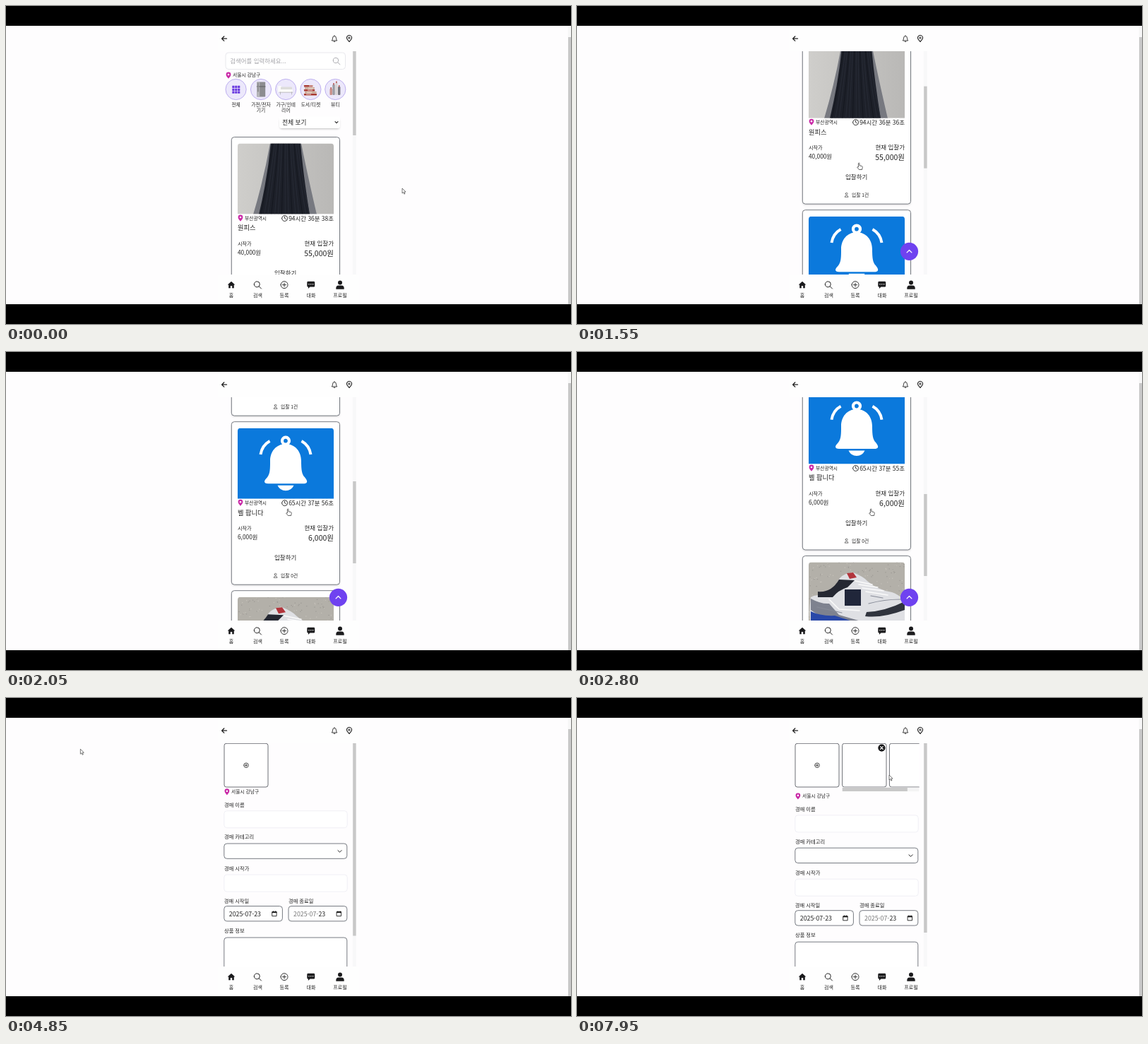
Write an HTML page that moves like this. It is 800 px wide and 450 px high and loops after 8000 ms.

```html
<!DOCTYPE html>
<html lang="ko">
<head>
<meta charset="utf-8">
<style>
  html, body { margin: 0; width: 100%; height: 100%; overflow: hidden; background: #000; }
  svg { display: block; width: 800px; height: 450px; }
  text { font-family: "Noto Sans CJK KR", "Noto Sans CJK", "Noto Sans", sans-serif; fill: #222; white-space: pre; }
  .line { fill: none; stroke: #222; stroke-linecap: round; stroke-linejoin: round; }
</style>
</head>
<body>
<svg id="stage" viewBox="0 0 800 450" xmlns="http://www.w3.org/2000/svg"></svg>
<script>
const LOOP = 8000, STEP = 50;
const LIST_END = 3100, IMAGES_AT = 7100;

// Drawing helpers; text is placed by its vertical centre.
const text = (x, cy, size, str, o = {}) =>
  `<text x="${x}" y="${cy + size * 0.36}" font-size="${size}" text-anchor="${o.anchor || 'start'}"
    font-weight="${o.weight || 400}" style="fill:${o.fill || '#222'}" ${o.id ? `id="${o.id}"` : ''}>${str}</text>`;
const rect = (x, y, w, h, fill, rx = 0, extra = '') =>
  `<rect x="${x}" y="${y}" width="${w}" height="${h}" rx="${rx}" fill="${fill}" ${extra}/>`;
const box = (x, y, w, h, stroke = '#555a63', width = 0.8, rx = 4) =>
  rect(x, y, w, h, '#fff', rx, `stroke="${stroke}" stroke-width="${width}"`);
const circle = (x, y, r, fill, extra = '') => `<circle cx="${x}" cy="${y}" r="${r}" fill="${fill}" ${extra}/>`;
const line = (d, width = 1, color = '#222') =>
  `<path class="line" d="${d}" stroke-width="${width}" style="stroke:${color}"/>`;
const shape = (d, fill) => `<path d="${d}" fill="${fill}"/>`;
const move = (x, y, body, id = '') => `<g ${id && `id="${id}"`} transform="translate(${x} ${y})">${body}</g>`;

// Icons, centred on the given point.
const pin = (x, y) => move(x, y,
  shape('M0 4.6C-1.6 2.6-3.4.8-3.4-1.2A3.4 3.4 0 0 1 3.4-1.2C3.4.8 1.6 2.6 0 4.6Z', '#c928a6') + circle(0, -1.1, 1.3, '#fff'));
const glass = (x, y, r, color, width) => move(x, y,
  line(`M${-r - 1} -1a${r} ${r} 0 1 0 ${2 * r} 0a${r} ${r} 0 1 0 ${-2 * r} 0M${r * .6} ${r * .6}L${r + 1.2} ${r + 1.2}`, width, color));
const plusCircle = (x, y, r, width) => move(x, y,
  line(`M${-r} 0a${r} ${r} 0 1 0 ${2 * r} 0a${r} ${r} 0 1 0 ${-2 * r} 0M${-r / 2} 0H${r / 2}M0 ${-r / 2}V${r / 2}`, width));
const chevron = (x, y, s, width, color, up = 1) => line(`M${x - s} ${y - s / 2 * up}L${x} ${y + s / 2 * up}L${x + s} ${y - s / 2 * up}`, width, color);

function header() {
  return rect(300, 28, 200, 36, '#fefefe') +
    line('M312.5 46.2H305.8M308.8 43L305.6 46.2L308.8 49.4', 1.3) +
    line('M461.5 48.7Q462.6 47.5 462.6 45.2A2.4 2.6 0 0 1 467.4 45.2Q467.4 47.5 468.5 48.7ZM464 50.3Q465 51.1 466 50.3M465 42.2V41.8', 0.9) +
    line('M486 50.6C484.6 48.7 482.4 47.2 482.4 45.1A3.6 3.6 0 0 1 489.6 45.1C489.6 47.2 487.4 48.7 486 50.6Z', 1.1) +
    line('M484.8 45.1a1.2 1.2 0 1 0 2.4 0a1.2 1.2 0 1 0-2.4 0', 0.9);
}

function nav() {
  const labels = [[319, '홈'], [356.5, '검색'], [394, '등록'], [432, '대화'], [473, '프로필']];
  return rect(300, 380, 200, 42, '#fefefe') +
    shape('M319 389.7L313.7 394.6H315.2V399.3H317.8V396H320.2V399.3H322.8V394.6H324.3Z', '#1b1b1d') +
    glass(356.3, 394.8, 4, '#222', 1) + plusCircle(394, 394.6, 5, 0.9) +
    shape('M427.7 389.8H435.8Q437.2 389.8 437.2 391.2V396.2Q437.2 397.6 435.8 397.6H430.4L427.9 400V397.6Q426.3 397.6 426.3 396.2V391.2Q426.3 389.8 427.7 389.8Z', '#1b1b1d') +
    [429, 431.8, 434.6].map(x => circle(x, 393.8, 0.75, '#fff')).join('') +
    circle(473, 391.6, 3, '#1b1b1d') +
    shape('M467.3 400.8Q466.8 395.4 471 395.4H475Q479.2 395.4 478.7 400.8Z', '#1b1b1d') +
    labels.map(([x, s]) => text(x, 409.3, 7, s, { anchor: 'middle' })).join('');
}

function categories() {
  const grid = Array.from({ length: 9 }, (_, i) =>
    rect(320.3 + i % 3 * 3.9, 112.8 + Math.floor(i / 3) * 3.9, 3.2, 3.2, '#6b3be0', 0.3)).join('');
  const fridge = rect(355.2, 107.5, 12, 21, '#8c8c90', 0.8) + rect(355.2, 107.5, 4, 21, '#b5b5b8', 0.8) +
    line('M355.2 114H367.2M357 109V113M357 115.5V121', 0.7, '#4c4c50');
  const sofa = rect(385, 113, 5, 9, '#fafafa', 1) + rect(389, 114.5, 16, 5, '#dddddb', 1) +
    rect(387, 118, 19, 4, '#fbfbf9', 1) + line('M387 122.2H406M388.5 122V125M404.5 122V125', 0.7, '#aaa');
  const books = [0, 1, 2, 3, 4].map(i => rect(422 + i % 2, 124 - i * 3, 18 - i * 1.4, 2.4, i % 2 ? '#c9a890' : '#a83a30', 0.4) +
    rect(425 + i, 124.6 - i * 3, 7, 0.9, '#f0e4d8')).join('');
  const beauty = [[458.5, 117, 9, '#c98f88'], [462.3, 111, 15, '#9b9ba2'], [466.2, 108.5, 17.5, '#d9d4d4'], [470, 114, 12, '#75757d']]
    .map(([x, y, h, c]) => rect(x, y, 3.4, h, c, 1) + rect(x + 0.9, y - 2, 1.6, 2.6, '#b85a55')).join('');
  const items = [[325.6, grid, '전체'], [361, fridge, '가전/전자', '기기'], [396.2, sofa, '가구/인테', '리어'],
    [431.4, books, '도서/티켓'], [466.3, beauty, '뷰티']];
  return items.map(([x, art, ...words]) =>
    circle(x, 118, 14.6, '#ece8fb', 'stroke="#b7a7ee" stroke-width="0.9"') + art +
    words.map((w, i) => text(x, 139.3 + i * 8.4, 6.75, w, { anchor: 'middle' })).join('')).join('');
}

function dress() {
  const folds = Array.from({ length: 15 }, (_, i) =>
    line(`M${378 + i * 2.5} 194Q${372 + i * 3.3} 240 ${361 + i * 4.9} 295`, 0.7, i % 3 ? '#2c303b' : '#11131b')).join('');
  return move(0, -185.5, rect(328, 194, 136, 101, 'url(#wall)') +
    shape('M374 194H418Q426 235 440 295H350Q365 245 374 194Z', '#777980') +
    shape('M375 194H417Q421 240 430 295H358Q370 245 375 194Z', '#1d2029') + folds);
}

function bell() {
  return move(0, -163.5, rect(328, 172, 136, 101, '#0b79dc') +
    line('M391 190.5a5 5 0 1 0 10 0a5 5 0 1 0-10 0', 4.2, '#fff') +
    shape('M396 195C410 195 418 206 418 219C418 232 419 238 423 242Q427 247 426 249Q425 251 421 251H371Q366 251 366 248Q366 246 370 242C374 237 374 230 374 219C374 206 382 195 396 195Z', '#fff') +
    shape('M384.5 253.5H407.5Q404 261 396 261Q388 261 384.5 253.5Z', '#fff') +
    '<path d="M373.5 190.8Q362.5 197 360.5 209.8M418.5 190.8Q429.5 197 431.5 209.8" fill="none" stroke="#fff" stroke-width="4"/>');
}

function shoe() {
  let seed = 7;
  const rnd = () => (seed = seed * 16807 % 2147483647) / 2147483647;
  const gravel = Array.from({ length: 260 }, () =>
    rect(328 + rnd() * 135, 297 + rnd() * 84, 1.3, 1, rnd() < 0.5 ? '#989590' : '#c9c5bd')).join('');
  return move(0, -288.5, rect(328, 297, 136, 101, '#b3b0a9') + gravel +
    shape('M331 347Q338 342 350 346Q364 338 372 320Q380 312 391 312Q406 318 411 324Q424 336 446 340Q463 346 464 358V398H333Q327 374 331 347Z', '#dfe0e4') +
    shape('M341 339Q360 341 371 322L393 323L383 333Q370 337 362 347L341 347Z', '#252832') +
    shape('M331 349Q346 357 357 356L371 372L402 381H372Q344 376 331 365Z', '#7e828f') +
    shape('M331 367Q345 374 365 373L393 382H331Z', '#2948a8') +
    shape('M410 368Q436 367 464 353V365Q432 377 408 374Z', '#30343e') +
    shape('M382 313L391 312L396 319L386 321Z', '#b2353c') +
    line('M394 324L418 329M399 329L426 333M404 334L434 338M409 339L440 344M357 350L371 364L400 366', 1.5, '#fafafa') +
    line('M413 356Q435 350 458 350M340 361L375 369M416 345L433 348', 1.2, '#888c98') +
    rect(379, 336, 23, 23, '#20263a'));
}

function card(y, art, name, start, now, bids, id) {
  const end = { anchor: 'end' };
  return move(0, y,
    rect(319.5, 2, 153, 230, '#000', 4, 'opacity=".13" filter="url(#soft)"') + box(319.3, 0, 153.2, 230.5) +
    `<g clip-path="url(#photo)">${art}</g>` + pin(332, 114.6) + text(338, 114.7, 6.75, '부산광역시') +
    line('M390.6 115a4 4 0 1 0 8 0a4 4 0 1 0-8 0M394.6 112.5V115L396.3 116', 0.9) +
    text(464, 115, 8.45, '', { ...end, id }) + text(328, 128.6, 9.2, name) +
    text(328, 151, 7.1, '시작가') + text(464, 150.7, 8.5, '현재 입찰가', end) +
    text(328, 163.2, 8.3, start) + text(464, 164.7, 10.5, now, end) +
    text(395.7, 192, 8.5, '입찰하기', { anchor: 'middle' }) +
    line('M380.2 216a1.4 1.4 0 1 0 2.8 0a1.4 1.4 0 1 0-2.8 0M379.2 220.3Q379.4 218.4 381.6 218.4Q383.8 218.4 384 220.3Z', 0.6) +
    text(389, 217.6, 6.75, `입찰 ${bids}건`));
}

function list() {
  return box(311, 66, 169.5, 23.5, '#e3e3e8') + text(317.3, 77.8, 8.45, '검색어를 입력하세요...', { fill: '#a5a5aa' }) +
    glass(468, 78, 3.7, '#9a9aa0', 0.8) + pin(315, 98.2) + text(321, 98, 6.75, '서울시 강남구') + categories() +
    rect(388, 160, 84, 14, '#000', 3, 'opacity=".25" filter="url(#soft)"') + rect(387, 156.5, 86, 16.5, '#fff', 3) +
    text(391.3, 164.6, 8.6, '전체 보기') + chevron(468, 164.6, 2, 1.1) +
    card(185.5, dress(), '원피스', '40,000원', '55,000원', 1, 'timerA') +
    card(424.5, bell(), '벨 팝니다', '6,000원', '6,000원', 0, 'timerB') +
    card(663.5, shoe(), '운동화', '50,000원', '50,000원', 0, 'timerC');
}

function dateField(x, w, label, head, fill) {
  return text(x, 287.3, 7.25, label) + box(x, 294.5, w, 21.3) +
    text(x + 7, 305.5, 8.8, `<tspan style="fill:${fill}">${head}</tspan>23`) +
    line(`M${x + w - 14.3} 302.7H${x + w - 8.3}V308.6H${x + w - 14.3}Z`, 0.9) +
    rect(x + w - 14.6, 302.1, 6.6, 2, '#222') +
    line(`M${x + w - 12.8} 301.6V302.5M${x + w - 9.8} 301.6V302.5`, 0.9);
}

function form() {
  const label = (y, s) => text(309, y, 7.25, s);
  const faint = y => box(308.8, y, 174.4, 24, '#ececf3');
  return box(309, 64.3, 62, 61.7, '#4a4d55', 0.8, 3) + plusCircle(340, 95.2, 3.3, 0.8) +
    `<g id="previews">` + box(375.6, 64.3, 62.4, 61.7, '#4a4d55', 0.8, 3) + box(442.4, 64.3, 62, 61.7, '#4a4d55', 0.8, 3) +
      circle(431.4, 70.6, 5.1, '#18181a') + line('M429.5 68.7L433.3 72.5M433.3 68.7L429.5 72.5', 1.1, '#fff') +
      rect(375.5, 126.6, 109, 5.6, '#f4f4f4') + rect(375.8, 126.8, 92, 5.2, '#c8c8c8') + `</g>` +
    `<g id="fields">` + pin(312.9, 132.8) + text(319, 132.8, 6.75, '서울시 강남구') +
      label(151, '경매 이름') + faint(159.7) + label(196.8, '경매 카테고리') + box(308.8, 206, 174, 21.3) +
      chevron(472.5, 216.9, 2.6, 1) + label(241.3, '경매 시작가') + faint(250) +
      dateField(308.8, 82.6, '경매 시작일', '2025-07-', '#222') + dateField(400, 82.8, '경매 종료일', '2025-07-', '#777') +
      label(329.7, '상품 정보') + box(308.8, 339, 174, 80) + `</g>`;
}

const hand = '<path d="M-.6 .6Q.3-.6 1 .6V3.8L4.5 4.6Q5.4 5 5.2 6.2L4.6 9.5H.4L-2.2 6.4Q-2.2 5.2-.6 6Z" fill="#fff" stroke="#333" stroke-width=".75"/>';
const arrow = '<path d="M0 0V7L1.6 5.5L2.8 8.1L4 7.6L2.9 5H5Z" fill="#fff" stroke="#333" stroke-width=".65"/>';

const stage = document.getElementById('stage');
stage.innerHTML = `<defs>
    <clipPath id="view"><rect x="300" y="64" width="184.6" height="316"/></clipPath>
    <clipPath id="photo"><path d="M328 109V13Q328 9 332 9H460Q464 9 464 13V109Z"/></clipPath>
    <filter id="soft" x="-10%" y="-30%" width="120%" height="160%"><feGaussianBlur stdDeviation="1.8"/></filter>
    <linearGradient id="wall"><stop stop-color="#cfcecb"/><stop offset="1" stop-color="#b9b8b6"/></linearGradient>
  </defs>` +
  rect(0, 0, 800, 450, '#000') + rect(0, 28, 800, 394, '#fefdfe') +
  rect(795.6, 28, 4.4, 394, '#f7f7f7') + rect(796, 44, 4, 378, '#c9c9c9') +
  `<g clip-path="url(#view)"><g id="list">${list()}</g><g id="form">${form()}</g></g>` +
  rect(490.8, 64, 5, 316, '#f8f8f9') + rect(491.2, 64, 4.4, 119, '#c8c8c8', 0, 'id="thumb"') +
  `<g id="toTop">${circle(470.5, 347.3, 12.6, '#6f42f0') + chevron(470.5, 347.2, 3.4, 1.3, '#fff', -1)}</g>` +
  header() + nav() + move(0, 0, `<g id="arrow">${arrow}</g><g id="hand">${hand}</g>`, 'cursor');

const el = Object.fromEntries([...stage.querySelectorAll('[id]')].map(n => [n.id, n]));
const show = (node, on) => node.setAttribute('display', on ? 'inline' : 'none');
const place = (node, x, y) => node.setAttribute('transform', `translate(${x} ${y})`);

const scrollKeys = [[1250, 0], [1300, 0.6], [1400, 45], [1500, 115], [1850, 261], [2100, 342], [2250, 375]];
const cursorKeys = [[600, 561, 258], [750, 575, 254], [1250, 374, 153], [1300, 374, 153], [1500, 399, 222],
  [2350, 399, 222], [2700, 416, 222], [2800, 416, 222], [3050, 394, 393], [3150, 394, 393], [3550, 340, 93],
  [3750, 340, 93], [3900, 352, 111], [4250, 127, 67], [4400, 127, 67], [4550, 146, 77], [4700, 101, 71],
  [4800, 101, 71], [5400, 322, 136], [5500, 322, 136], [5750, 328, 200], [5850, 328, 200], [6150, 314, 282],
  [6650, 450, 106], [7750, 450, 106], [7950, 442, 109]];
const linear = p => p, smooth = p => p * p * (3 - 2 * p);

function track(keys, t, ease) {
  const i = keys.findIndex(k => k[0] > t);
  if (i === 0) return keys[0].slice(1);
  if (i < 0) return keys[keys.length - 1].slice(1);
  const a = keys[i - 1], b = keys[i], p = ease((t - a[0]) / (b[0] - a[0]));
  return a.slice(1).map((v, k) => v + (b[k + 1] - v) * p);
}

function render(t) {
  const [scroll] = track(scrollKeys, t, linear);
  const onList = t < LIST_END, loaded = t >= IMAGES_AT;
  const ticks = Math.floor((t + 800) / 900);
  show(el.list, onList);
  show(el.form, !onList);
  show(el.toTop, onList && scroll > 125);
  show(el.previews, loaded);
  place(el.list, 0, -scroll);
  place(el.fields, 0, loaded ? 6.2 : 0);
  el.timerA.textContent = `94시간 36분 ${38 - ticks}초`;
  el.timerB.textContent = `65시간 37분 ${59 - ticks}초`;
  el.thumb.setAttribute('y', onList ? 64 + scroll * 0.3653 : 64);
  el.thumb.setAttribute('height', onList ? (scroll > 125 ? 116 : 119) : (loaded ? 268 : 272.5));
  const pointing = t >= 1450 && t < 3200;
  show(el.hand, pointing);
  show(el.arrow, !pointing);
  place(el.cursor, ...track(cursorKeys, t, smooth));
}

const origin = performance.now();
function frame() {
  const t = Math.max(0, performance.now() - origin) % LOOP;
  render(Math.floor(t / STEP) * STEP);
  requestAnimationFrame(frame);
}
render(0);
requestAnimationFrame(frame);
</script>
</body>
</html>
```
